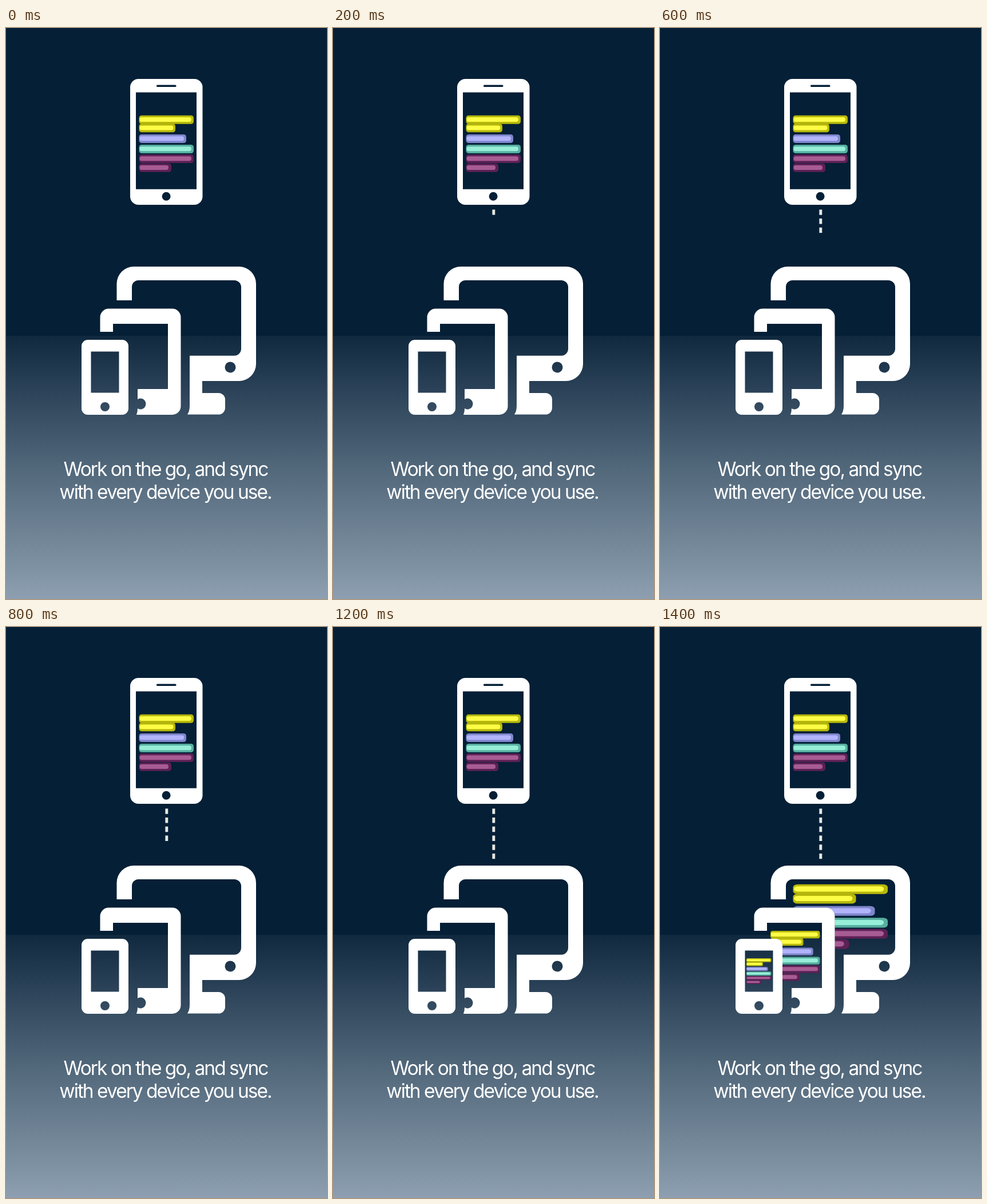
Recreate the animation shown at these times as an HTML page. Size 561 px wide and 998 px high, loop 3200 ms.

```html
<!DOCTYPE html>
<html lang="en">
<head>
<meta charset="utf-8">
<title>Sync</title>
<style>
  html, body { margin: 0; width: 100%; height: 100%; overflow: hidden; background: #041f36; }
  svg { display: block; width: 100%; height: 100%; }
  .caption {
    font: 400 33.5px Inter, "Open Sans", sans-serif;
    font-optical-sizing: none;
    letter-spacing: -2px;
    text-anchor: middle;
    fill: #fff;
  }
  .link { transform-box: fill-box; animation: link 3.2s steps(6, end) infinite; }
  .synced { animation: synced 3.2s step-end infinite; }
  /* one dash every 200 ms */
  @keyframes link {
    0% { clip-path: inset(0 0 94.5px 0); }
    37.5%, 100% { clip-path: inset(0 0 0 0); }
  }
  @keyframes synced {
    0% { opacity: 0; }
    43.75%, 100% { opacity: 1; }
  }
</style>
</head>
<body>
<svg viewBox="0 0 561 998">
  <defs>
    <linearGradient id="floor" x1="0" y1="0" x2="0" y2="1">
      <stop offset="0" stop-color="#10293f"/>
      <stop offset=".22" stop-color="#2d445a"/>
      <stop offset=".5" stop-color="#51677a"/>
      <stop offset="1" stop-color="#8d9fb0"/>
    </linearGradient>

    <g id="bars">
      <g fill="#b7b80c">
        <rect width="95.5" height="15" rx="4.5"/>
        <rect y="14.5" width="63.5" height="15" rx="4.5"/>
      </g>
      <rect y="33.3" width="82.5" height="15" rx="4.5" fill="#7f86cc"/>
      <rect y="51.3" width="95.5" height="15" rx="4.5" fill="#57aea0"/>
      <g fill="#5c2156">
        <rect y="68.3" width="95.5" height="15" rx="4.5"/>
        <rect y="84" width="56.5" height="15" rx="4.5"/>
      </g>
      <g fill="#fdfd45">
        <rect x="1" y="3.2" width="90.5" height="8" rx="3.6"/>
        <rect x="1" y="17.7" width="59" height="8" rx="3.6"/>
      </g>
      <rect x="1" y="36.5" width="77.5" height="8" rx="3.6" fill="#b2b4fb"/>
      <rect x="1" y="54.5" width="90.5" height="8" rx="3.6" fill="#97eed8"/>
      <g fill="#a75c93">
        <rect x="1" y="71.5" width="90.5" height="8" rx="3.6"/>
        <rect x="1" y="87.2" width="50.5" height="8" rx="3.6"/>
      </g>
    </g>

    <!-- screen areas left free by the device in front -->
    <clipPath id="monitorView">
      <path d="M220 440H412V575H305.5V505.5a15 15 0 0 0-15-15H220z"/>
    </clipPath>
    <clipPath id="tabletView">
      <path d="M187 517H283V631H214V556a11 11 0 0 0-11-11H187z"/>
    </clipPath>
  </defs>

  <rect width="561" height="998" fill="#041f36"/>
  <rect y="538" width="561" height="460" fill="url(#floor)"/>

  <g class="synced">
    <g clip-path="url(#monitorView)">
      <use href="#bars" transform="translate(232.5 449.7) scale(1.733 1.142)"/>
    </g>
    <g clip-path="url(#tabletView)">
      <use href="#bars" transform="translate(193 531) scale(.906 .885)"/>
    </g>
    <use href="#bars" transform="translate(151 579) scale(.455)"/>
  </g>

  <g fill="#fff" fill-rule="evenodd">
    <!-- sending phone -->
    <path d="M231.5 89H329a14.5 14.5 0 0 1 14.5 14.5V294.5a14.5 14.5 0 0 1-14.5 14.5H231.5a14.5 14.5 0 0 1-14.5-14.5V103.5a14.5 14.5 0 0 1 14.5-14.5z
      M227 112.5V281.8H333V112.5z
      M264.7 99.5a1.8 1.8 0 0 0 0 3.6H295.8a1.8 1.8 0 0 0 0-3.6z
      M272.6 294.3a7.5 7.5 0 1 0 15 0a7.5 7.5 0 1 0-15 0z"/>
    <!-- monitor -->
    <path d="M193.5 476V447a30 30 0 0 1 30-30H407a30 30 0 0 1 30 30V587a30 30 0 0 1-30 30H343V638H371.5a11.5 11.5 0 0 1 11.5 11.5V664a11.5 11.5 0 0 1-11.5 11.5H317Q321 670 321 660V572.7H399a12 12 0 0 0 12-12V453a12 12 0 0 0-12-12H231.5a11.5 11.5 0 0 0-11.5 11.5V476z
      M382.5 593a9.5 9.5 0 1 0 19 0a9.5 9.5 0 1 0-19 0z"/>
    <!-- tablet -->
    <path d="M164.5 531V505.5a15 15 0 0 1 15-15H290.5a15 15 0 0 1 15 15V661a15 15 0 0 1-15 15H228Q230 671 230 665.1A9.5 9.5 0 1 0 230 648.9V631H283V517H187V531z"/>
    <!-- small phone -->
    <path d="M143 545H203a11 11 0 0 1 11 11V665a11 11 0 0 1-11 11H143a11 11 0 0 1-11-11V556a11 11 0 0 1 11-11z
      M148.5 565.5V637.5H197.5V565.5z
      M165 662a8 8 0 1 0 16 0a8 8 0 1 0-16 0z"/>
  </g>

  <use href="#bars" x="232.5" y="152.7"/>

  <path class="link" fill="#e8e8e4" d="M278.2 317.3h5.3v9.5h-5.3z m0 15.75h5.3v9.5h-5.3z m0 15.75h5.3v9.5h-5.3z m0 15.75h5.3v9.5h-5.3z m0 15.75h5.3v9.5h-5.3z m0 15.75h5.3v9.5h-5.3z"/>

  <g class="caption">
    <text x="279" y="783">Work on the go, and sync</text>
    <text x="278.5" y="823">with every device you use.</text>
  </g>
</svg>
</body>
</html>
```
